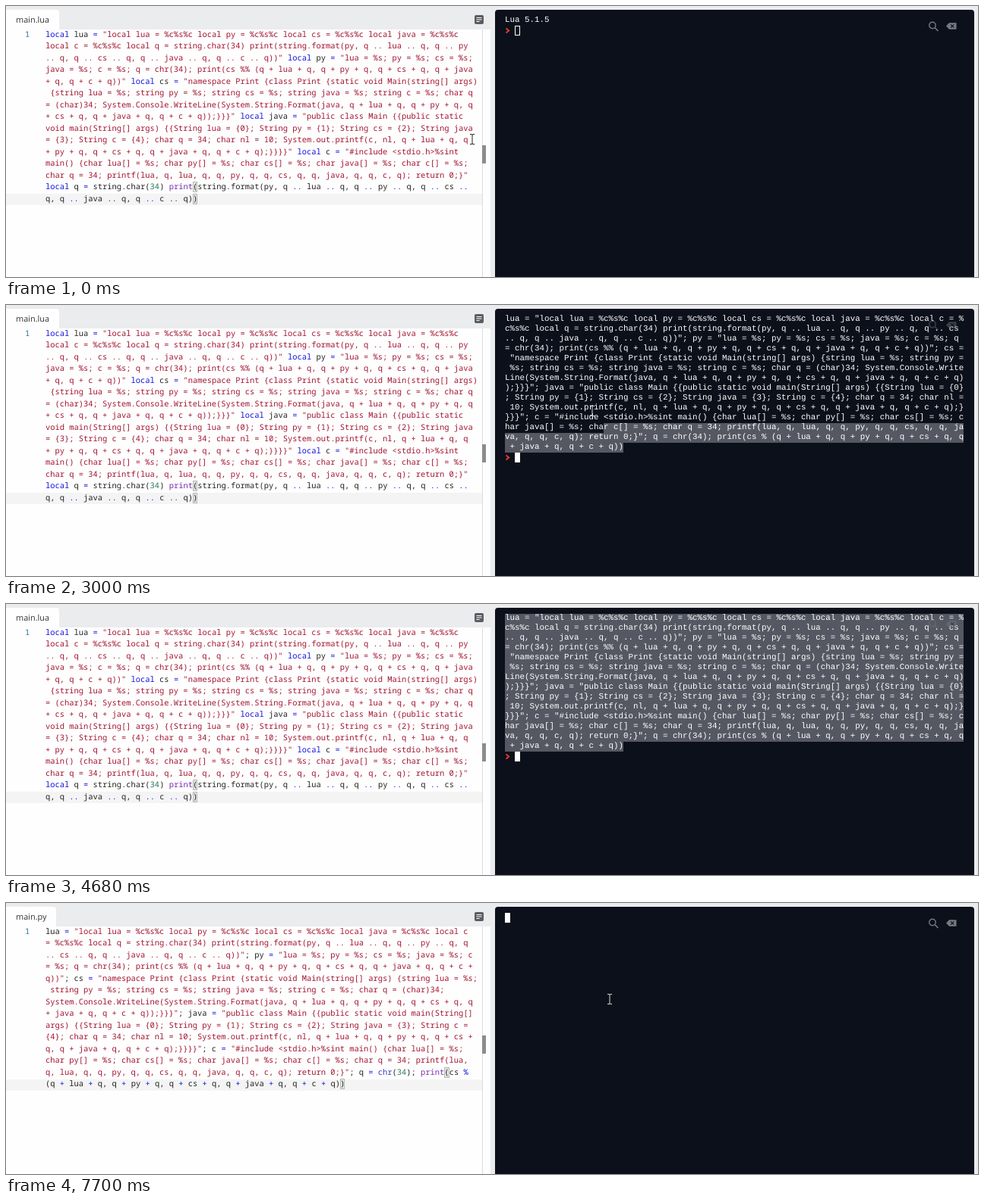
Write an HTML page that moves like this. It is 1280 px wide and 358 px high and loops after 8000 ms.

```html
<!DOCTYPE html>
<html lang="en">
<head>
<meta charset="utf-8">
<title>Polyglot quine</title>
<style>
html, body { margin: 0; width: 100%; height: 100%; overflow: hidden; background: #ebecee; }
#stage { position: relative; width: 1280px; height: 358px; overflow: hidden; text-rendering: geometricPrecision; }
#stage > *, #term > *, #menu > * { position: absolute; }
#tab { left: 0; top: 5px; height: 26px; padding: 0 13px; background: #fefefe; border-radius: 0 4px 0 0;
  font: 10.9px/27px "Open Sans", sans-serif; color: #333; }
#pane { left: 0; top: 31px; width: 638px; height: 327px; background: #fefefe; }
#rule { left: 627px; top: 31px; width: 1px; height: 327px; background: #dcdcdc; }
#active { left: 0; width: 627px; height: 15px; background: #f4f4f4; }
#thumb { left: 627px; width: 5px; height: 24px; background: #8c8c8c; }
.code { font: 10.43px/15.5px "Noto Sans Mono", monospace; white-space: pre; color: #222; top: 30.75px; }
#code { left: 52px; }
#num { left: 25px; color: #237893; }
.str { color: #a31530; }
.key, .op { color: #1414e0; }
.fn { color: #7a30b0; }
.chr { color: #3c3cc0; }
.dig { color: #2a7a5a; }
.match { background: #e6e9e4; outline: 1px solid #b4b8b4; outline-offset: -1px; }
.caret { display: inline-block; width: 2px; height: 15px; margin-right: -2px; background: #111; vertical-align: top; }
#term { left: 644px; top: 5px; width: 631px; height: 353px; background: #0c101b; border-radius: 4px 4px 0 0; }
#out { left: 13px; top: 8px; color: #fff; white-space: pre;
  font: 10.83px/13px "Liberation Mono", monospace; }
#out div { height: 13px; }
#out span { display: inline-block; height: 13px; background: #555862; }
#block { width: 7px; height: 13px; box-sizing: border-box; border: 1px solid #fff; }
#prompt { left: 14px; }
#menu { left: 682px; top: 50px; width: 432px; height: 246px; background: #fff; border: 1px solid #bcbcbc;
  box-shadow: 2px 2px 4px rgba(0, 0, 0, .4); font: 9.4px/19px "Open Sans", sans-serif; color: #222; }
#menu div { left: 0; width: 432px; height: 19px; }
#menu b { position: absolute; left: 29px; font-weight: 400; white-space: pre; }
#menu u { position: absolute; right: 18px; text-decoration: none; color: #666; letter-spacing: .3px; }
#menu em { position: absolute; right: 6px; top: 6px; border: 3px solid transparent; border-left: 4px solid #555; border-right: 0; }
#menu hr { left: 1px; width: 430px; height: 1px; margin: 0; border: 0; background: #e4e4e4; }
#menu i { left: 9px; top: 202px; width: 10px; height: 10px; background: #fbbc04; }
#menu .hot { background: #ebebeb; }
svg { overflow: visible; }
</style>
</head>
<body>
<div id="stage">
  <div id="tab"></div>
  <div id="pane"></div>
  <div id="active"></div>
  <div id="rule"></div>
  <div id="thumb"></div>
  <div id="num" class="code">1</div>
  <div id="code" class="code"></div>
  <svg style="left:617px;top:12px" width="12" height="12">
    <rect width="12" height="12" rx="2" fill="#5a5d62"/>
    <path d="M2.5 3.5h7M2.5 6h7M2.5 8.5h4" stroke="#fff"/>
  </svg>
  <div id="term">
    <div id="out"></div>
    <svg id="prompt" width="6" height="13"><path d="M.5 3.5l3.8 3-3.8 3" fill="none" stroke="#e8402c" stroke-width="1.7"/></svg>
    <div id="block"></div>
    <svg id="tools" style="left:571px;top:15px" width="40" height="13">
      <circle cx="5" cy="5.5" r="4.2" fill="none" stroke="#777a80" stroke-width="1.4"/>
      <path d="M8 8.5l4.5 4.5" stroke="#777a80" stroke-width="1.6"/>
      <path d="M23 6.5l4-4.2h9.5v8.4h-9.5z" fill="#777a80"/>
      <path d="M29 4.3l4.4 4.4m0-4.4l-4.4 4.4" stroke="#0c101b" stroke-width="1.2"/>
    </svg>
  </div>
  <div id="menu"></div>
  <svg id="beam" width="1" height="1"><path d="M-3-6.5h2q1 0 1 1 0-1 1-1h2M-3 6.5h2q1 0 1-1 0 1 1 1h2M0-5.5v11" fill="none"/></svg>
  <svg id="arrow" width="1" height="1"><path d="M0 0v12.5l3-2.7 2 4.6 2-.9-2-4.4h4z" fill="#fff" stroke="#222" stroke-width=".9"/></svg>
</div>
<script>
const LOOP = 8000, COLS = 93, ROW = 13;
const $ = id => document.getElementById(id);

// "|" marks where the editor wraps a line
const luaCode = 'local lua = "local lua = %c%s%c local py = %c%s%c local cs = %c%s%c local java = %c%s%c |' +
  'local c = %c%s%c local q = string.char(34) print(string.format(py, q .. lua .. q, q .. py |' +
  '.. q, q .. cs .. q, q .. java .. q, q .. c .. q))" local py = "lua = %s; py = %s; cs = %s; |' +
  'java = %s; c = %s; q = chr(34); print(cs %% (q + lua + q, q + py + q, q + cs + q, q + java |' +
  '+ q, q + c + q))" local cs = "namespace Print {class Print {static void Main(string[] args)|' +
  ' {string lua = %s; string py = %s; string cs = %s; string java = %s; string c = %s; char q |' +
  '= (char)34; System.Console.WriteLine(System.String.Format(java, q + lua + q, q + py + q, q |' +
  '+ cs + q, q + java + q, q + c + q));}}}" local java = "public class Main {{public static |' +
  'void main(String[] args) {{String lua = {0}; String py = {1}; String cs = {2}; String java |' +
  '= {3}; String c = {4}; char q = 34; char nl = 10; System.out.printf(c, nl, q + lua + q, q |' +
  '+ py + q, q + cs + q, q + java + q, q + c + q);}}}}" local c = "#include <stdio.h>%sint |' +
  'main() {char lua[] = %s; char py[] = %s; char cs[] = %s; char java[] = %s; char c[] = %s; |' +
  'char q = 34; printf(lua, q, lua, q, q, py, q, q, cs, q, q, java, q, q, c, q); return 0;}" |' +
  'local q = string.char(34) print(string.format(py, q .. lua .. q, q .. py .. q, q .. cs .. |' +
  'q, q .. java .. q, q .. c .. q))';

const pyCode = 'lua = "local lua = %c%s%c local py = %c%s%c local cs = %c%s%c local java = %c%s%c local c |' +
  '= %c%s%c local q = string.char(34) print(string.format(py, q .. lua .. q, q .. py .. q, q |' +
  '.. cs .. q, q .. java .. q, q .. c .. q))"; py = "lua = %s; py = %s; cs = %s; java = %s; c |' +
  '= %s; q = chr(34); print(cs %% (q + lua + q, q + py + q, q + cs + q, q + java + q, q + c + |' +
  'q))"; cs = "namespace Print {class Print {static void Main(string[] args) {string lua = %s;|' +
  ' string py = %s; string cs = %s; string java = %s; string c = %s; char q = (char)34; |' +
  'System.Console.WriteLine(System.String.Format(java, q + lua + q, q + py + q, q + cs + q, q |' +
  '+ java + q, q + c + q));}}}"; java = "public class Main {{public static void main(String[] |' +
  'args) {{String lua = {0}; String py = {1}; String cs = {2}; String java = {3}; String c = |' +
  '{4}; char q = 34; char nl = 10; System.out.printf(c, nl, q + lua + q, q + py + q, q + cs + |' +
  'q, q + java + q, q + c + q);}}}}"; c = "#include <stdio.h>%sint main() {char lua[] = %s; |' +
  'char py[] = %s; char cs[] = %s; char java[] = %s; char c[] = %s; char q = 34; printf(lua, |' +
  'q, lua, q, q, py, q, q, cs, q, q, java, q, q, c, q); return 0;}"; q = chr(34); print(cs % |' +
  '(q + lua + q, q + py + q, q + cs + q, q + java + q, q + c + q))';

const output = pyCode.replaceAll('|', '');
const escape = s => s.replace(/</g, '&lt;');
const wrap = s => escape(s).replaceAll('|', '\n');
const span = (cls, s) => `<span class="${cls}">${s}</span>`;

function highlight(code) {
  const token = /("[^"]*")|\b(local)\b|\b(print)\(|\b(chr)\b|(\d+)|(\.\.|[=+%])|(\)$)/g;
  return wrap(code).replace(token, (all, str, key, print, chr, dig, op) =>
    str ? span('str', str) : key ? span('key', key) :
    print ? span('fn', print) + span('match', '(') :
    chr ? span('chr', chr) : dig ? span('dig', dig) :
    op ? span('op', op) : span('match', all));
}

const luaHtml = highlight(luaCode), pyHtml = highlight(pyCode), pyPlain = wrap(pyCode);
const caret = '<i class="caret"></i>';

// Terminal rows; everything from character index "from" on is selected
function outputHtml(from) {
  let html = '';
  for (let i = 0; i < output.length; i += COLS) {
    const row = output.slice(i, i + COLS), cut = Math.max(0, from - i);
    const rest = row.slice(cut);
    html += `<div>${escape(row.slice(0, cut))}${rest && `<span>${escape(rest)}</span>`}</div>`;
  }
  return html;
}

const items = [
  [13, 'Cut', 'Ctrl+X'], [32, 'Copy', 'Ctrl+C'], [50, 'Paste', 'Ctrl+V'],
  [69, 'Paste as plain text', 'Ctrl+Shift+V'], [88, 'Select all', 'Ctrl+A'],
  [115, 'Search Norvel for “lua = "local lua = %c%s%c local py = %c%s%c local...”'],
  [134, 'Print...', 'Ctrl+P'], [161, 'Spell check', '>'], [180, 'Writing Direction', '>'],
  [208, 'Save selection to Tuck'], [235, 'Inspect', 'Ctrl+Shift+I']
];
$('menu').innerHTML = items.map(([y, label, hint]) =>
  `<div style="top:${y - 10}px"><b>${label}</b>${hint === '>' ? '<em></em>' : hint ? `<u>${hint}</u>` : ''}</div>`
).join('') + [101, 147, 194, 221].map(y => `<hr style="top:${y}px">`).join('') + '<i></i>';
const rows = $('menu').querySelectorAll('div');

// Index of the current step when n steps fall evenly between a and b, first at a
const step = (t, a, b, n) => Math.min(n - 1, Math.floor((t - a) / ((b - a) / (n - 1)) + .03));
const lerp = (a, b, k) => a + (b - a) * k;
const line = (x0, y0, x1, y1, k) => [lerp(x0, x1, k), lerp(y0, y1, k)];
const dragStep = t => step(t, 2920, 3270, 9);

function mouse(t) {
  if (t < 560) return [613, 175];
  if (t < 970) return line(613, 175, 527, -16, (step(t, 560, 970, 8) + 1) / 8);
  if (t < 2180) return null;
  if (t < 2920) return line(698, 135, 809, 188, step(t, 2180, 2330, 4) / 3);
  if (t < 3270) {
    const k = .71 ** dragStep(t);
    return [678 + 131 * k, 18 + 170 * k];
  }
  if (t < 3990) return null;
  if (t < 4190) return [688, 53];
  if (t < 4270) return [692, 63];
  if (t < 4680) return [697, 75];
  if (t < 5310) return null;
  if (t < 6520) return [423, 160];
  if (t < 6930) return line(423, 160, 512, 10, (step(t, 6520, 6600, 3) + 1) / 3);
  if (t < 7110) return line(512, 10, 545, -16, (step(t, 6930, 7110, 5) + 1) / 5);
  if (t < 7540) return null;
  return line(592, 2, 794, 126, step(t, 7540, 7700, 5) / 4);
}

function terminal(t) {
  const top = { html: '', prompt: -1, row: 0, col: 0, block: 'solid' };
  if (t < 1630) return { html: 'Lua 5.1.5', prompt: 1, row: 1, col: 2, block: t < 1400 ? 'hollow' : 'solid' };
  if (t < 1700) return top;
  if (t < 5310) {
    const from = t < 2920 ? output.length : Math.max(0, output.length - 190 * dragStep(t));
    return { html: outputHtml(from), prompt: 14, row: 14, col: 2, block: 'solid', dim: true };
  }
  if (t < 7660) return { html: 'Python 3.8.2 (default, Feb 26 2020, 02:56:10)', prompt: 1, row: 1, col: 2, block: '' };
  return top;
}

const cache = {};
function setHtml(id, html) {
  if (cache[id] !== html) $(id).innerHTML = cache[id] = html;
}
const show = (id, on) => { $(id).style.display = on ? '' : 'none'; };
function place(id, x, y) {
  $(id).style.left = x + 'px';
  $(id).style.top = y + 'px';
}

function draw(t) {
  const lua = t < 5310, empty = !lua && t < 6460;
  setHtml('tab', lua ? 'main.lua' : 'main.py');
  setHtml('code', lua ? luaHtml : empty ? caret : t < 6520 ? pyPlain + caret : pyHtml + (t < 6560 ? caret : ''));
  $('active').style.top = Math.round(31 + 15.5 * (lua ? 14 : empty ? 0 : 13)) + 'px';
  $('thumb').style.top = (lua ? 184 : 175) + 'px';

  const s = terminal(t);
  setHtml('out', s.html);
  show('prompt', s.prompt >= 0);
  $('prompt').style.top = 8 + ROW * s.prompt + 'px';
  show('block', s.block);
  place('block', 13 + 6.5 * s.col, 8 + ROW * s.row);
  $('block').style.background = s.block === 'solid' ? '#fff' : 'none';
  $('tools').style.opacity = s.dim ? .45 : 1;

  const open = t >= 3990 && t < 4680;
  show('menu', open);
  rows[0].className = t >= 4190 && t < 4270 ? 'hot' : '';
  rows[1].className = t >= 4270 ? 'hot' : '';

  const m = mouse(t), pointer = m && (open || m[1] < 31 && m[0] < 644);
  show('beam', m && !pointer);
  show('arrow', pointer);
  if (m) {
    place(pointer ? 'arrow' : 'beam', Math.round(m[0]) + (pointer ? 0 : .5), Math.round(m[1]) + .5);
    $('beam').style.stroke = m[0] > 643 ? '#d8d8d8' : '#222';
  }
}

const start = performance.now();
function tick() {
  draw((performance.now() - start) % LOOP);
  requestAnimationFrame(tick);
}
tick();
</script>
</body>
</html>
```
